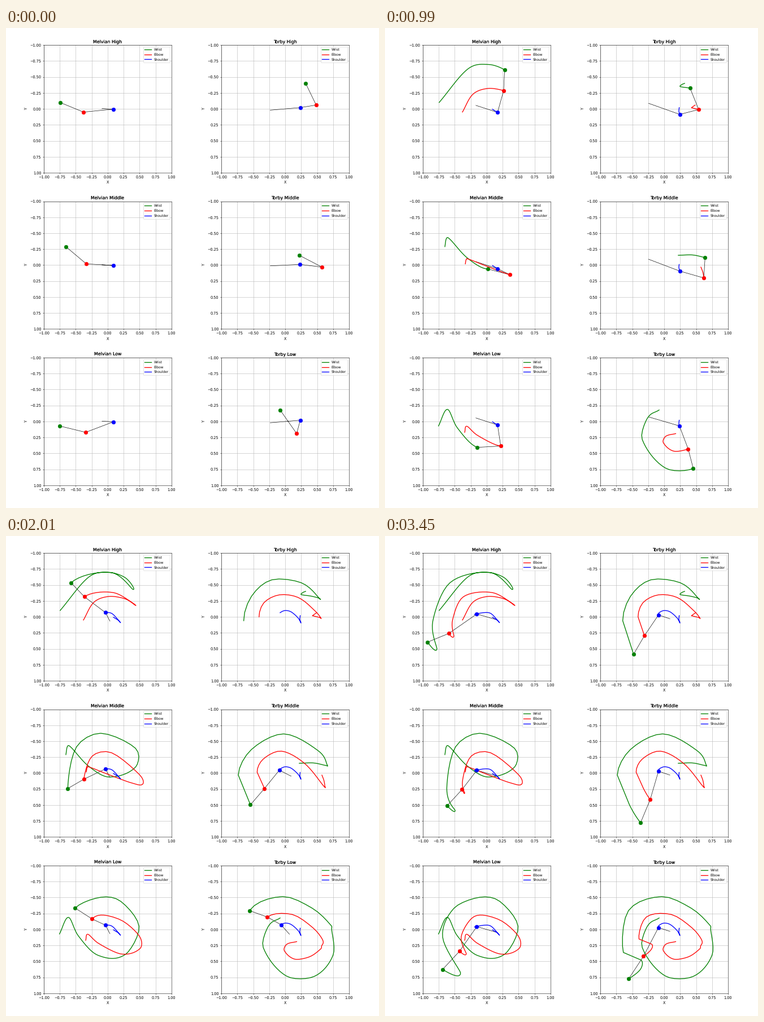
A matplotlib script for the animation above (3480 ms loop, 660 by 849 pixels).

```python
import numpy as np
import matplotlib.pyplot as plt
from matplotlib.animation import FuncAnimation

W, H, SIDE = 660, 849, 225.9
FRAMES, STEP = 116, 30
JOINTS = [("Wrist", "green"), ("Elbow", "red"), ("Shoulder", "blue")]

plt.rcParams["font.family"] = "DejaVu Sans"
plt.rcParams["text.hinting"] = "no_hinting"


def glide(keys, x):
    """Catmull-Rom curve through rows of (time, hundredths...), resting at the end."""
    keys = np.array(keys, float)
    t, p = keys[:, 0], keys[:, 1:] / 100
    slope = np.zeros_like(p)
    slope[0] = (p[1] - p[0]) / (t[1] - t[0])
    slope[1:-1] = (p[2:] - p[:-2]) / (t[2:] - t[:-2])[:, None]
    x = np.clip(x, t[0], t[-1])
    k = np.clip(np.searchsorted(t, x, "right") - 1, 0, len(t) - 2)
    h = (t[k + 1] - t[k])[:, None]
    s = (x - t[k])[:, None] / h
    return (p[k] * (1 + 2 * s) * (1 - s) ** 2 + p[k + 1] * s ** 2 * (3 - 2 * s)
            + h * s * (1 - s) * (slope[k] * (1 - s) - slope[k + 1] * s))


# Shoulder turn of each player: time, x, y
TURNS = {
    "Melvian": [(0, 9, .5), (13, 12, 2.5), (33, 17, 5.5), (47, 19.5, 8.5),
                (58, 7, -5), (67, -3.5, -6.7), (83, -18.5, -4), (115, -15.5, -4.5)],
    "Torby": [(0, 23.5, -2), (20, 23, 4), (40, 24.5, 9.5), (47, 20, 1.5),
              (53, 9, -8), (57, 0, -10), (64, -8, -6.5), (80, -9, -3)],
}


class Panel:
    """One swing; poses hold time, wrist x y, elbow x y. Joints vanish in the gap."""

    def __init__(self, row, player, height, poses, gap=(), lag=0):
        frames = np.arange(FRAMES)
        shoulder = glide(TURNS[player], frames - lag)
        self.pos = np.hstack([glide(poses, frames), shoulder]).reshape(FRAMES, 3, 2)
        self.seen = ~np.isin(frames, gap)

        col = list(TURNS).index(player)
        left, top = 67 + 314.1 * col, 30.1 + 276.45 * row
        self.ax = ax = fig.add_axes([left / W, 1 - (top + SIDE) / H, SIDE / W, SIDE / H])
        ticks = np.linspace(-1, 1, 9)
        ax.set(xlim=(-1, 1), ylim=(1, -1), xticks=ticks, yticks=ticks,
               xlabel="X", ylabel="Y", title=f"{player} {height}")
        ax.grid(True)
        self.limb, = ax.plot([], [], color="black", lw=1)
        self.trails, self.dots = [], []
        for name, color in JOINTS:
            self.trails += ax.plot([], [], color=color, lw=2, label=name)
            self.dots += ax.plot([], [], "o", color=color, ms=10)
        self.legend = ax.legend(loc="upper right", fontsize=9)

    def hide_scenery(self):
        self.legend.remove()
        self.ax.set_axis_off()

    def show(self, n):
        past = self.pos[:n + 1][self.seen[:n + 1]]
        now = self.pos[n:n + 1] if self.seen[n] else self.pos[:0]
        for j in range(3):
            self.trails[j].set_data(past[:, j, 0], past[:, j, 1])
            self.dots[j].set_data(now[:, j, 0], now[:, j, 1])
        # the far shoulder mirrors the near one about the centre
        chain = np.concatenate([now, -now[:, 2:]], axis=1).reshape(-1, 2)
        self.limb.set_data(chain[:, 0], chain[:, 1])
        return [self.limb, *self.trails, *self.dots]


fig = plt.figure(figsize=(14, 18.0091), dpi=47.14286)

panels = [
    Panel(0, "Melvian", "High", [
        (0, -74.5, -10, -38, 5),
        (13, -29.5, -62.5, -21.5, -23),
        (24, 3, -69.5, 2, -32),
        (33, 28, -61, 26.5, -28.5),
        (49, 39.5, -43, 43.5, -18),
        (58, 5, -69.5, 9, -38),
        (67, -57.5, -53.5, -36.5, -31.5),
        (75, -84.5, 7, -53.5, 5),
        (84, -78, 50.5, -51.5, 30.5),
        (108, -92.5, 39.5, -59.5, 26),
    ]),
    Panel(1, "Melvian", "Middle", [
        (0, -65.5, -29, -33.5, -2),
        (7, -63, -42, -32, -9),
        (13, -57.5, -40.5, -28.5, -9.5),
        (23, -30, -11, 1, 2),
        (33, 2, 6, 36.5, 15),
        (47, 44, -10, 55, 17),
        (52, 43.5, -39, 49.5, 2),
        (57, -11, -62.5, 6, -32),
        (61, -49, -41, -24, -27),
        (67, -62.5, 24, -37.5, 9.5),
        (81, -49.5, 58.5, -34.5, 31),
        (115, -62, 51, -38.5, 25.5),
    ]),
    Panel(2, "Melvian", "Low", [
        (0, -75.5, 7, -34.5, 17),
        (11, -61.5, -19, -31, 7.5),
        (21, -46, 10, -14, 22),
        (33, -15, 40.5, 22, 38.5),
        (47, 28.5, 38.5, 51, 29.5),
        (53, 49, -5, 50, 11),
        (58, 20.5, -44, 24, -13),
        (62, -10.5, -50.5, -6, -22.5),
        (67, -51, -33.5, -24.5, -16.5),
        (75, -69, 12, -40, 12),
        (84, -41, 68, -32, 38),
        (115, -69, 62.5, -42.5, 34),
    ]),
    Panel(0, "Torby", "High", [
        (0, 32, -40, 48.5, -6),
        (13, 27.5, -38, 43, -2),
        (20, 25, -35, 44, -1.5),
        (33, 40.5, -32.5, 54, 1),
        (40, 51, -30, 56, 2),
        (47, 53.5, -29, 46, -10),
        (53, 25, -53.5, 20, -30.5),
        (57, -21, -58, -9, -34.5),
        (61, -53, -32, -33.5, -22),
        (64, -65, 6, -41, 0),
        (69, -48, 58.5, -31, 29.5),
    ], gap=range(65, 69)),
    Panel(1, "Torby", "Middle", [
        (0, 22, -15.5, 57.5, 3),
        (13, 44, -16, 60.5, 11),
        (33, 64, -12, 62, 20),
        (38, 66, -12.5, 61, 21),
        (47, 50.5, -36, 29.5, -16),
        (53, -2.5, -61.5, -6, -34.5),
        (58, -53, -37, -34.5, -22),
        (62, -73.5, 3, -44, -1.5),
        (67, -54.5, 49.5, -32.5, 24),
        (81, -37, 77.5, -22, 41.5),
    ], gap=range(63, 67), lag=-3),
    Panel(2, "Torby", "Low", [
        (0, -8, -18, 18, 19),
        (13, -27, -4, 2, 23.5),
        (18, -34.5, 28, -1.5, 33),
        (27, 2, 73, 15, 46.5),
        (33, 45.5, 73.5, 37.5, 43),
        (41, 75, 40, 55, 31),
        (47, 73, 2, 57, 26),
        (54, 69, -9.5, 58.5, 16),
        (58, 42, -33.5, 43, -3),
        (62, -4, -51.5, 11, -23.5),
        (67, -56, -29.5, -28, -19.5),
        (72, -64, 36, -39.5, 15),
        (78, -36, 48, -19.5, 23),
        (83, -37, 62, -20.5, 31.5),
        (97, -55.5, 77, -32.5, 42),
    ], gap=range(73, 78), lag=5),
]

# Draw the still axes once and keep them as a backdrop behind the moving parts.
fig.canvas.draw()
backdrop = np.array(fig.canvas.buffer_rgba())
for panel in panels:
    panel.hide_scenery()
fig.figimage(backdrop, zorder=-1)


def update(n):
    return [artist for panel in panels for artist in panel.show(n)]


anim = FuncAnimation(fig, update, frames=FRAMES, interval=STEP,
                     repeat=True, repeat_delay=0, blit=False)
plt.show()
```
